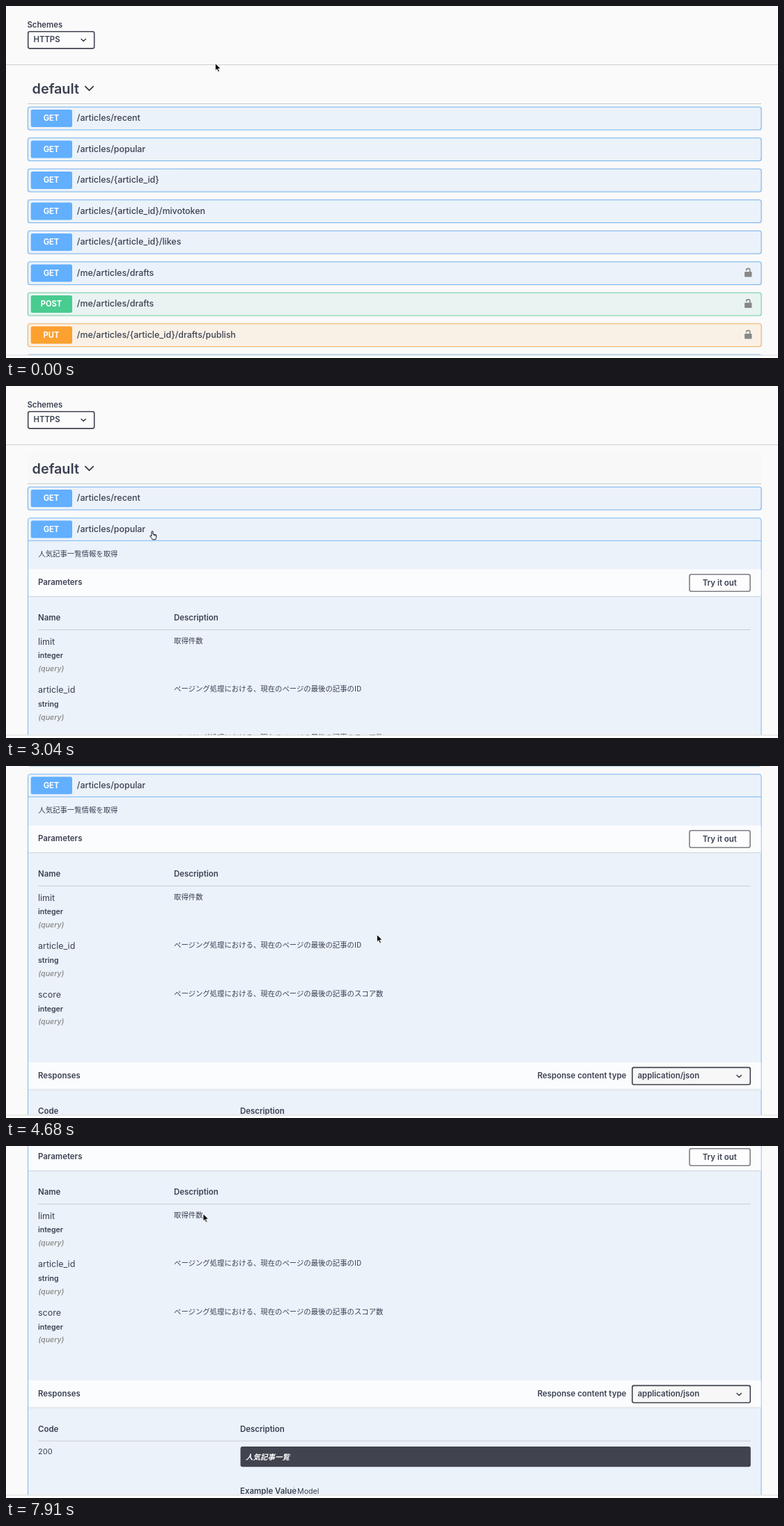
Write an HTML page that moves like this. It is 1108 px wide and 506 px high and loops after 8 s.

```html
<!DOCTYPE html>
<html lang="ja">
<head>
<meta charset="utf-8">
<title>API docs</title>
<style>
html, body { margin: 0; width: 100%; height: 100%; overflow: hidden; background: #fafafa; }
svg { display: block; width: 100vw; height: 100vh; }
text { font: 600 11.45px Inter, "Noto Sans CJK JP", "Noto Sans CJK", sans-serif; fill: #3b4151; }
.title { font-size: 19.8px; }
.label { font-size: 11.3px; }
.method { font-size: 11.2px; font-weight: 700; fill: #fff; text-anchor: middle; }
.path { font-size: 12.45px; font-weight: 500; }
.ja { font-family: "Noto Sans CJK JP", "Noto Sans CJK", sans-serif; font-size: 10.38px; font-weight: 400; }
.note { font-size: 10.5px; font-weight: 700; font-style: italic; fill: #fff; }
.name { font-size: 12.5px; font-weight: 400; }
.type { font-size: 10.5px; }
.in { font-size: 10.6px; font-weight: 500; font-style: italic; fill: #858585; }
.plain { font-size: 11px; font-weight: 400; }
.tab { font-size: 10.7px; font-weight: 400; }
.mid { text-anchor: middle; }
.end { text-anchor: end; }
.chev { fill: none; stroke: #33363f; stroke-linecap: round; stroke-linejoin: round; }
.rule { stroke: #c9ced6; }
.select { stroke: #41444e; stroke-width: 1.6; }

#page, #list, #detail, #hover, #cursor, #cursor > * { animation: 8s step-end infinite; }
#page { animation-name: scroll; }
#list { animation-name: list; }
#detail { animation-name: detail; }
#hover { animation-name: hover; }
#cursor { animation-name: move; }
#arrow { animation-name: arrow; }
#hand { animation-name: hand; }
#beam { animation-name: beam; }

@keyframes scroll {
  0% { transform: translateY(0); }
  54.75% { transform: translateY(-89px); }
  58.5% { transform: translateY(-178px); }
  62.5%, 100% { transform: translateY(-267px); }
}
@keyframes list { 0% { visibility: visible; } 38%, 100% { visibility: hidden; } }
@keyframes detail { 0% { visibility: hidden; } 38%, 100% { visibility: visible; } }
@keyframes hover {
  0% { visibility: hidden; }
  13.875% { visibility: visible; }
  54.75%, 100% { visibility: hidden; }
}
@keyframes move {
  0% { transform: translate(300px, 82px); }
  1.875% { transform: translate(238px, 92px); }
  4.5% { transform: translate(196px, 97px); }
  13.875% { transform: translate(160px, 106px); }
  15.75% { transform: translate(95px, 124px); }
  17.5% { transform: translate(55px, 142px); }
  19.375% { transform: translate(46px, 160px); }
  21.25% { transform: translate(80px, 180px); }
  23% { transform: translate(135px, 196px); }
  24.875% { transform: translate(185px, 204px); }
  26.75% { transform: translate(208px, 206px); }
  28.625% { transform: translate(207px, 207px); }
  38% { transform: translate(206px, 208px); }
  41.625% { transform: translate(290px, 236px); }
  43.5% { transform: translate(400px, 249px); }
  45.375% { transform: translate(490px, 250px); }
  47.25% { transform: translate(526px, 243px); }
  51% { transform: translate(532px, 242px); }
  62.5% { transform: translate(530px, 237px); }
  70.375% { transform: translate(520px, 225px); }
  72.75% { transform: translate(470px, 190px); }
  74.625% { transform: translate(390px, 148px); }
  76.5% { transform: translate(310px, 105px); }
  78.375% { transform: translate(278px, 90px); }
  80.125% { transform: translate(277px, 91px); }
  82% { transform: translate(279px, 92px); }
  85.75% { transform: translate(282.5px, 98px); }
  98.875%, 100% { transform: translate(282.5px, 97px); }
}
@keyframes arrow {
  0% { visibility: visible; }
  13.875% { visibility: hidden; }
  41.625% { visibility: visible; }
  62.5% { visibility: hidden; }
  70.375% { visibility: visible; }
  78.375% { visibility: hidden; }
  85.75%, 100% { visibility: visible; }
}
@keyframes hand {
  0% { visibility: hidden; }
  13.875% { visibility: visible; }
  41.625%, 100% { visibility: hidden; }
}
@keyframes beam {
  0% { visibility: hidden; }
  62.5% { visibility: visible; }
  70.375% { visibility: hidden; }
  78.375% { visibility: visible; }
  85.75%, 100% { visibility: hidden; }
}
</style>
</head>
<body>
<svg viewBox="0 0 1108 506">
  <rect width="1108" height="506" fill="#fafafa"/>
  <g id="page">
    <text class="label" x="30.5" y="31.3">Schemes</text>
    <rect class="select" x="31.7" y="36.7" width="95" height="24.4" rx="2.5" fill="#fcfcfc"/>
    <text class="label" x="39.5" y="52.3">HTTPS</text>
    <path class="chev" stroke-width="1.4" d="M108 47.6l3.2 3 3.2-3"/>
    <path stroke="#cfcfd1" d="M0 84.5H1108"/>
    <rect id="hover" x="31" y="97" width="1053" height="43" fill="#f8f8f8"/>
    <text class="title" x="37.6" y="126">default</text>
    <path class="chev" stroke-width="1.7" d="M113.8 115.6l5.7 5.7 5.7-5.7"/>
    <path stroke="#c6c8cc" d="M31 140.5H1084"/>
    <g id="first"></g>
    <g id="list"></g>
    <g id="detail">
      <rect x="31.5" y="189.8" width="1052.5" height="700" rx="3" fill="#ebf2fa" stroke="#79b6f3"/>
      <g id="head"></g>
      <path stroke="#79b6f3" d="M31 222.3H1084"/>
      <text class="ja" x="46.3" y="244.8">人気記事一覧情報を取得</text>

      <g id="bars"></g>
      <text x="46" y="286.4">Parameters</text>
      <rect x="981" y="270.7" width="87" height="24.6" rx="2.5" fill="#fdfdfe" stroke="#7c7e83" stroke-width="1.6"/>
      <text class="mid" x="1024.3" y="286.6">Try it out</text>
      <text x="46" y="337">Name</text>
      <text x="241" y="337">Description</text>
      <path class="rule" d="M46 350.5H1069"/>
      <g id="params"></g>

      <text x="46" y="627">Responses</text>
      <text class="end" x="890.3" y="627">Response content type</text>
      <rect class="select" x="898.8" y="611.4" width="169.4" height="24.6" rx="2.5" fill="#f7f7f7"/>
      <text x="906.5" y="627">application/json</text>
      <path class="chev" stroke-width="1.4" d="M1049 622.4l3.2 3 3.2-3"/>
      <text x="46" y="677.7">Code</text>
      <text x="336" y="677.7">Description</text>
      <path class="rule" d="M46 691H1069"/>
      <text class="plain" x="46" y="710">200</text>
      <rect x="336.5" y="699" width="732.3" height="29.3" rx="3" fill="#41444e"/>
      <text class="ja note" x="344" y="717.8">人気記事一覧</text>
      <text x="336" y="766.5">Example Value</text>
      <path stroke="#b5bac3" stroke-width=".8" d="M413 756V770"/>
      <text class="tab" x="418" y="766.5">Model</text>
    </g>
  </g>

  <rect y="502" width="1108" height="4" fill="#fdfdfd"/>
  <path stroke="#dcdcdc" d="M0 502H1108"/>

  <g id="cursor">
    <path id="arrow" fill="#000" stroke="#fff" stroke-width=".8" d="M.4.4V11l2.4-2.2 1.7 4 1.8-.8-1.7-3.9H8Z"/>
    <path id="hand" fill="#fff" stroke="#111" stroke-width="1" stroke-linejoin="round" d="M3 8V1.6a1 1 0 0 1 2 0V5l3.9.8q1.1.3 1 1.5l-.5 3.2-.7 2.2H4.3Q3.6 11 1.1 8.5.4 7.4 1.2 7.1 2.2 7 3 8ZM6.6 5.5V7.4M8.3 5.9V7.6"/>
    <path id="beam" fill="none" stroke="#222" stroke-width="1.1" d="M.6.6Q3 .6 3.2 2.2 3.4.6 5.8.6M3.2 2V11M.6 12.4Q3 12.4 3.2 10.8 3.4 12.4 5.8 12.4M2 8.6H4.4"/>
  </g>
</svg>
<script>
const put = (id, html) => document.getElementById(id).innerHTML = html;

const colors = {
  GET: ['#61affe', '#79b6f3', '#ebf2f9'],
  POST: ['#49cc90', '#70d3a8', '#e9f3f2'],
  PUT: ['#fca130', '#f3b564', '#faf1e6']
};

const lock = y => `<g fill="#888" transform="translate(1060 ${y + 9.3})">
  <rect y="5.2" width="10.4" height="7.6" rx="1"/>
  <path d="M2.6 3.6V3a2.6 2.4 0 0 1 5.2 0V6" fill="none" stroke="#888" stroke-width="1.6"/></g>`;

const label = (y, method, path) => `
  <rect x="35.7" y="${y + 4}" width="59.3" height="25" rx="2.5" fill="${colors[method][0]}"/>
  <text class="method" x="65" y="${y + 20}">${method}</text>
  <text class="path" x="101.8" y="${y + 20.4}">${path}</text>`;

const rowTop = i => 145 + 44.5 * i;

function row(i, method, path, locked) {
  const y = rowTop(i), [, edge, fill] = colors[method];
  const box = `x="31.5" y="${y + .3}" width="1052.5" height="32.7" rx="3"`;
  return `<rect ${box} fill="none" stroke="#000" stroke-opacity=".04" stroke-width="3"/>
    <rect ${box} fill="${fill}" stroke="${edge}" stroke-width="1.1"/>`
    + label(y, method, path) + (locked ? lock(y) : '');
}

const rows = [
  ['GET', '/articles/popular'],
  ['GET', '/articles/{article_id}'],
  ['GET', '/articles/{article_id}/mivotoken'],
  ['GET', '/articles/{article_id}/likes'],
  ['GET', '/me/articles/drafts', true],
  ['POST', '/me/articles/drafts', true],
  ['PUT', '/me/articles/{article_id}/drafts/publish', true],
  ['GET', '']
];
put('first', row(0, 'GET', '/articles/recent'));
put('list', rows.map((r, i) => row(i + 1, ...r)).join(''));
put('head', label(rowTop(1), 'GET', '/articles/popular'));

put('bars', [263.5, 604].map(y => `
  <rect x="32" y="${y}" width="1051.5" height="39" fill="#fbfcfe"/>
  <path stroke="#d5dbe3" d="M32 ${y + 39}H1083.5"/>
  <path stroke="#e2e9f1" d="M32 ${y + 40}H1083.5"/>`).join(''));

const paging = 'ページング処理における、現在のページの最後の記事の';
const params = [
  ['limit', 'integer', '取得件数'],
  ['article_id', 'string', paging + 'ID'],
  ['score', 'integer', paging + 'スコア数']
];
put('params', params.map(([name, type, about], i) => `
  <g transform="translate(0 ${69.8 * i})">
    <text class="name" x="46" y="371.6">${name}</text>
    <text class="type" x="46" y="391">${type}</text>
    <text class="in" x="46.3" y="409.8">(query)</text>
    <text class="ja" x="241" y="369.6">${about}</text>
  </g>`).join(''));
</script>
</body>
</html>
```
